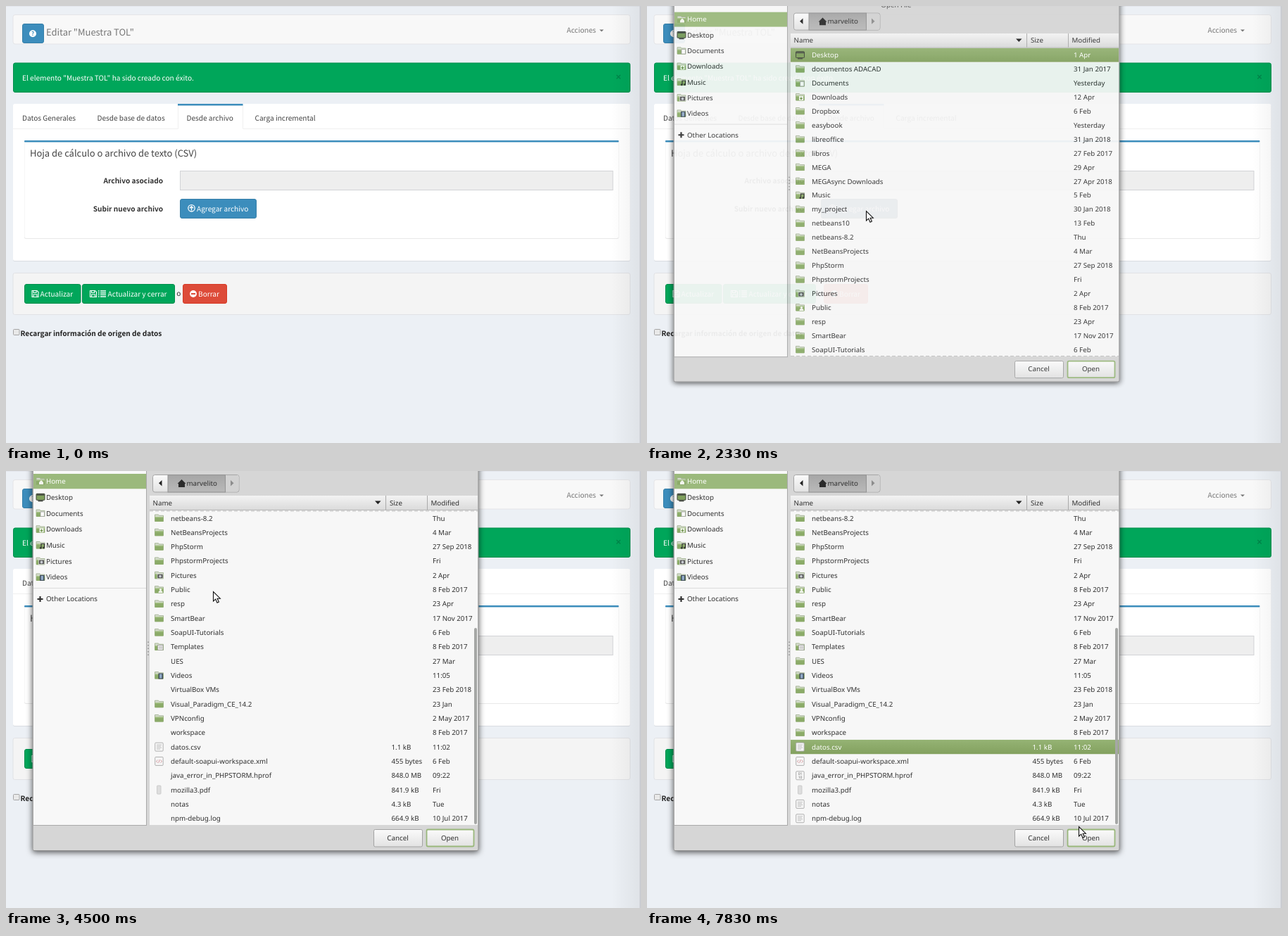
These frames come from a looping animation (902x621 px, 8 s). An HTML page:

```html
<!DOCTYPE html>
<html lang="es">
<head>
<meta charset="utf-8">
<title>Editar origen de datos</title>
<style>
  html, body { margin: 0; width: 100%; height: 100%; overflow: hidden; background: #ecf0f5; }
  svg { display: block; width: 902px; height: 621px; }
  text { text-rendering: geometricPrecision; white-space: pre; }
  .page { font: 10.1px "Noto Sans CJK JP", "Noto Sans CJK SC", "Noto Sans CJK", sans-serif; }
  .title { font-size: 12.96px; }
  .bold { font-weight: 700; }
  .dialog { font: 9.75px "Noto Sans", "Open Sans", sans-serif; }
</style>
</head>
<body>
<svg viewBox="0 0 902 621">
  <defs>
    <linearGradient id="edge"><stop stop-opacity="0"/><stop offset="1" stop-opacity=".055"/></linearGradient>
    <linearGradient id="row" x2="0" y2="1"><stop stop-color="#95b374"/><stop offset="1" stop-color="#83a15f"/></linearGradient>
    <linearGradient id="head" x2="0" y2="1"><stop stop-color="#f3f3f3"/><stop offset="1" stop-color="#dadada"/></linearGradient>
    <linearGradient id="button" x2="0" y2="1"><stop stop-color="#fbfbfb"/><stop offset="1" stop-color="#e2e2e2"/></linearGradient>
    <linearGradient id="pressed" x2="0" y2="1"><stop stop-color="#a6a6a6"/><stop offset="1" stop-color="#b9b9b9"/></linearGradient>
    <filter id="shadow" x="-5%" y="-5%" width="110%" height="110%">
      <feDropShadow dx="0" dy="2" stdDeviation="4" flood-opacity=".65"/>
    </filter>
    <clipPath id="listArea"><rect x="204" y="56" width="466" height="447"/></clipPath>
  </defs>
  <g id="page" class="page"></g>
  <g id="dialog" class="dialog"></g>
  <path id="cursor" d="M.5 .5V14L3.7 11.1 6 16.2 8.4 15.1 6.1 10.2H10.3Z" fill="#fff" stroke="#111" stroke-width="1.1"/>
</svg>
<script>
const $ = id => document.getElementById(id);
const STEPS = 48, STEP_MS = 1000 / 6;
const PROJECT = "Muestra TOL", USER = "marvelito";

// Cursor positions, one per step, keyed by the step at which each movement begins.
const MOVES = {
  3: [[59, 33], [103, 90], [160, 158], [220, 218], [272, 262], [318, 286], [337, 291]],
  10: [[298, 291], [311, 291]],
  19: [[304, 262], [277, 218], [266, 186], [294, 171]],
  33: [[301, 190], [310, 228], [299, 282], [280, 336], [261, 374], [251, 391]],
  43: [[302, 408], [395, 442], [488, 476], [578, 507], [613, 505]]
};

// name | modified | icon | size
const FILES = `Desktop|1 Apr|desktop
documentos ADACAD|31 Jan 2017|folder
Documents|Yesterday|page
Downloads|12 Apr|down
Dropbox|6 Feb|folder
easybook|Yesterday|folder
libreoffice|31 Jan 2018|folder
libros|27 Feb 2017|folder
MEGA|29 Apr|folder
MEGAsync Downloads|27 Apr 2018|folder
Music|5 Feb|music
my_project|30 Jan 2018|folder
netbeans10|13 Feb|folder
netbeans-8.2|Thu|folder
NetBeansProjects|4 Mar|folder
PhpStorm|27 Sep 2018|folder
PhpstormProjects|Fri|folder
Pictures|2 Apr|picture
Public|8 Feb 2017|public
resp|23 Apr|folder
SmartBear|17 Nov 2017|folder
SoapUI-Tutorials|6 Feb|folder
Templates|8 Feb 2017|template
UES|27 Mar|folder
Videos|11:05|video
VirtualBox VMs|23 Feb 2018|folder
Visual_Paradigm_CE_14.2|23 Jan|folder
VPNconfig|2 May 2017|folder
workspace|8 Feb 2017|folder
datos.csv|11:02|file|1.1 kB
default-soapui-workspace.xml|6 Feb|xml|455 bytes
java_error_in_PHPSTORM.hprof|09:22|binary|848.0 MB
mozilla3.pdf|Fri|pdf|841.9 kB
notas|Tue|file|4.3 kB
npm-debug.log|10 Jul 2017|file|664.9 kB`.split("\n").map(line => line.split("|"));
const ROW = 20.32, CSV = 29;
// Step at which slowly loaded icons show up.
const LATE_ICONS = { 23: 33, 25: 33, 28: 33, 31: 43, 33: 43, 34: 43 };

const rect = (x, y, w, h, fill, stroke = "none", r = 0, more = "") =>
  `<rect x="${x}" y="${y}" width="${w}" height="${h}" rx="${r}" fill="${fill}" stroke="${stroke}" ${more}/>`;
const path = (d, fill, stroke = "none", width = 1, more = "") =>
  `<path d="${d}" fill="${fill}" stroke="${stroke}" stroke-width="${width}" ${more}/>`;
const circle = (x, y, r, fill, stroke = "none", width = 1) =>
  `<circle cx="${x}" cy="${y}" r="${r}" fill="${fill}" stroke="${stroke}" stroke-width="${width}"/>`;
const text = (x, y, s, fill, more = "") => `<text x="${x}" y="${y}" fill="${fill}" ${more}>${s}</text>`;

const floppy = x =>
  path(`M${x} 404.5h7l2 2v7h-9zM${x + 2} 404.5v3h4v-3M${x + 2} 413.5v-3.5h5v3.5`, "none", "#fff", 1.1);

function drawPage(buttonState) {
  const [buttonFill, buttonEdge] = {
    idle: ["#3c8dbc", "#367fa9"], hover: ["#367fa9", "#2f6f94"], down: ["#2a4d74", "#122b40"]
  }[buttonState];
  const bold = 'class="bold"', boldEnd = 'class="bold" text-anchor="end"';
  return [
    rect(0, 0, 902, 621, "#ecf0f5"), rect(0, 0, 902, 1, "#e3e6ec"),
    // heading
    rect(10, 12.5, 876.5, 41.5, "#f8f8f8", "#e5e5e7", 3),
    rect(23.5, 25.5, 30, 27, "#3c8dbc", "#367fa9", 2.5),
    circle(38, 39.2, 5, "#fff"),
    text(38, 42.2, "?", "#3c8dbc", 'class="bold" font-size="8" text-anchor="middle"'),
    text(57, 42, `Editar "${PROJECT}"`, "#777", 'class="title"'),
    text(796.5, 38, "Acciones", "#777"), path("M843 33.5h6l-3 3z", "#777"),
    // notice
    rect(10.5, 81, 876, 41.5, "#00a65a", "#008d4c", 2.5),
    text(23, 106, `El elemento "${PROJECT}" ha sido creado con éxito.`, "#fff"),
    path("M867.3 98l5.4 5.4m0-5.4l-5.4 5.4", "none", "#00854a", 1.4),
    // tabs
    rect(10, 140, 876.5, 223, "#d9dce1", "none", 2.5), rect(10, 139, 876.5, 223, "#fff", "none", 2.5),
    path("M10 174.5H244.5V140M336.5 140V174.5H886", "none", "#f0f0f0"),
    rect(244, 139, 92.5, 2.5, "#3c8dbc"),
    text(23, 162.5, "Datos Generales", "#444"), text(129.5, 162.5, "Desde base de datos", "#444"),
    text(256.5, 162.5, "Desde archivo", "#444"), text(353.5, 162.5, "Carga incremental", "#444"),
    // upload box
    rect(26, 192, 844.5, 139, "#e8e8e8", "none", 2.5), rect(26.4, 192, 843.7, 138, "#fff", "none", 2.5),
    rect(26, 191, 844.5, 2.4, "#3c8dbc", "none", 1),
    text(34, 213.5, "Hoja de cálculo o archivo de texto (CSV)", "#444", 'class="title"'),
    text(223, 252, "Archivo asociado", "#333", boldEnd),
    rect(247.5, 234.5, 614.5, 27, "#eee", "#d2d3d6"),
    text(223, 292, "Subir nuevo archivo", "#333", boldEnd),
    rect(247.5, 274.5, 108, 27, buttonFill, buttonEdge, 2.5),
    circle(263.5, 287.3, 4.7, "none", "#fff", 1.3),
    path("M263.5 290.5V285M261 287.2l2.5-2.5 2.5 2.5", "none", "#fff", 1.4),
    text(271, 292, "Agregar archivo", "#fff"),
    // actions
    rect(10, 379.5, 876.5, 59, "#f4f4f4", "#e1e2e5", 2.5),
    rect(26.5, 395.5, 79.5, 27, "#00a65a", "#008d4c", 2.5), floppy(37), text(48.5, 413, "Actualizar", "#fff"),
    rect(108.5, 395.5, 131, 27, "#00a65a", "#008d4c", 2.5), floppy(119.5),
    path("M131 405h1.6m1.4 0h8M131 407.7h1.6m1.4 0h8M131 410.4h1.6m1.4 0h8M131 413h1.6m1.4 0h8", "none", "#fff", 1.4),
    text(144.5, 413, "Actualizar y cerrar", "#fff"), text(242.3, 412, "o", "#333"),
    rect(251.5, 395.5, 62, 27, "#dd4b39", "#d73925", 2.5),
    circle(266, 409, 4.9, "#fff"), rect(263, 408, 6, 2, "#dd4b39"), text(273, 413, "Borrar", "#fff"),
    rect(10.5, 459.5, 8.5, 8, "#e9e9e9", "#a5a5a5", 1),
    text(20.5, 469, "Recargar información de origen de datos", "#222", bold),
    rect(860, 0, 40, 621, "url(#edge)"), rect(900, 0, 2, 621, "#cbcdd2")
  ].join("");
}

function emblem(kind) {
  return {
    page: rect(6.5, -2, 5.5, 6.5, "#fafafa", "#999", 0, 'stroke-width=".7"'),
    down: rect(5, -1.5, 6, 6, "#f2f5ee") + path("M8 -.5v2.5M6.4 1.5h3.2L8 3.6z", "#6b8f48", "#6b8f48", .8),
    music: path("M7.5 3.5V-2h4.5v5", "none", "#333", 1.2) + circle(6.8, 3.8, 1.4, "#333") + circle(11, 3.6, 1.4, "#333"),
    picture: rect(4, -2, 8, 6.5, "#555", "#eee", 0, 'stroke-width=".6"') + circle(8, 1.3, 1.9, "#c8ccd2"),
    public: circle(8.5, 0, 1.6, "#f2f5ee") + path("M5.5 4.5q0-3 3-3t3 3z", "#f2f5ee"),
    template: rect(4.5, -2.5, 7.5, 7, "#eee", "#999", 0, 'stroke-width=".7"') + path("M6 0h5M6 2h5", "none", "#999", .7),
    video: rect(5.5, -3, 6.5, 8, "#3e4a57") + rect(7, -2, 3.5, 6, "#8fa9c6"),
    home: path("M4.5 1.5L7.5 -1.5 10.5 1.5V4.5h-6z", "#f2f5ee")
  }[kind] || "";
}

function icon(kind, x, y) {
  const sheet = rect(.7, -6, 11.5, 12, "#f5f5f5", "#aaa", 1.2, 'stroke-width=".9"');
  const art = {
    desktop: () => rect(.5, -5, 12, 9, "#7fa05c", "#3d4238", .8) + rect(1, -4.5, 11, 2, "#4a5045") + path("M3 5.3h7", "none", "#3d4238", 1.4),
    file: () => sheet + path("M3 -3h7M3 -1h6M3 1h7M3 3h5", "none", "#b5b5b5", .8),
    xml: () => sheet + path("M4.5 -1.8l-2 2 2 2M8.5 -1.8l2 2-2 2M7.2 -2.2l-1.4 4.4", "none", "#cc7f86", .8),
    binary: () => sheet + text(6.5, -.6, "01", "#666", 'font-size="5" text-anchor="middle"') + text(6.5, 4.4, "10", "#666", 'font-size="5" text-anchor="middle"'),
    pdf: () => rect(3.5, -6, 5.5, 12, "#dedede", "#c5c5c5", 1, 'stroke-width=".8"')
  }[kind];
  const folder = () => path("M.5 4.5V-5h5l1 1.3h6V4.5z", "#d5dccd", "#9aab88", .8) + rect(.5, -2, 12, 7, "#8bab68", "none", .6) + rect(.5, -2, 12, 1.3, "#a9c48a") + emblem(kind);
  return `<g transform="translate(${x} ${y})">${(art || folder)()}</g>`;
}

function drawSidebar() {
  const places = ["Home|home", "Desktop|desktop", "Documents|page", "Downloads|down", "Music|music", "Pictures|picture", "Videos|video"];
  return rect(38.5, -20, 161, 523.5, "#f8f8f8", "#a9a9a9") + rect(39, 4, 160, 21.3, "#9bb97c") +
    places.map((place, i) => {
      const [name, kind] = place.split("|"), y = 14.6 + i * 22.72;
      return icon(kind, 42.5, y) + text(57, y + 3.5, name, i ? "#303030" : "#fff");
    }).join("") +
    rect(39, 166, 160, 1, "#dcdcdc") +
    path("M44.5 182h8M48.5 178v8", "none", "#303030", 2.2) + text(57, 185.3, "Other Locations", "#303030") +
    path("M202 242.5v20", "none", "#8d8d8d", 1.5, 'stroke-dasharray="1.5 3"');
}

function drawList(step) {
  const scrolled = step >= 27, selected = step >= 40 ? CSV : 0;
  const top = scrolled ? 67 - 13 * ROW : 66.2;
  const rows = FILES.map(([name, modified, kind, size = ""], i) => {
    const y = top + i * ROW, color = i === selected ? "#fff" : "#303030";
    if (y < 50 || y > 510) return "";
    return (i === selected ? rect(204, y - 10.2, 466, ROW, "url(#row)") : "") +
      (step >= (LATE_ICONS[i] || 0) ? icon(kind, 211, y) : "") +
      text(234, y + 3.5, name, color) + text(547.5, y + 3.5, size, color) + text(606, y + 3.5, modified, color);
  }).join("");
  const barOpacity = step < 19 || step === 41 || step === 42 ? 0 : step === 40 ? .5 : 1;
  return `<g clip-path="url(#listArea)">` + rect(204, 56, 466, 447, "#f7f7f7") + rows +
    path(`M204 ${scrolled ? 57 : 502.3}H670`, "none", "#c2c2c2", 1, 'stroke-dasharray="5 3"') +
    rect(665, scrolled ? 223 : 58, 4, 279, "#a5a7a5", "none", 2, `opacity="${barOpacity}"`) + "</g>";
}

function drawDialog(step) {
  const label = (x, s) => text(x, 524.7, s, "#303030", 'text-anchor="middle"');
  return [
    rect(38, -20, 633, 559.5, "#d6d6d6", "#8a8a8a", 2, 'filter="url(#shadow)"'),
    text(354, -3, "Open File", "#555", 'text-anchor="middle"'),
    drawSidebar(),
    // path bar
    rect(208.5, 5.5, 122.5, 24.5, "url(#button)", "#a5a5a5", 3),
    rect(311.5, 6, 19, 23.5, "#d2d2d2", "none", 2),
    rect(230, 5.5, 81.5, 24.5, "url(#pressed)", "#939393"),
    path("M221.5 13v8.5l-4.5-4.2z", "#222"), path("M319 13v8.5l4.5-4.2z", "#8d8d8d"),
    path("M243.5 18l6-6 6 6h-1.5v5h-9v-5z", "#2b2b2b"),
    text(256.5, 20.8, USER, "#303030"),
    // column heads
    rect(204, 35, 466, 20.5, "url(#head)"), rect(204, 55, 466, 1, "#b5b5b5"),
    path("M539.5 35v20M598.5 35v20", "none", "#aaa"),
    text(208.5, 48.5, "Name", "#303030"), text(545, 48.5, "Size", "#303030"), text(603.5, 48.5, "Modified", "#303030"),
    path("M524 42.5h8.5l-4.2 4.7z", "#222"),
    drawList(step),
    rect(522.5, 509.5, 69, 24.5, "url(#button)", "#a3a3a3", 2), label(556.5, "Cancel"),
    rect(597.5, 509.5, 67, 24, "url(#button)", "#9ab87c", 2, 'stroke-width="1.8"'), label(630.5, "Open")
  ].join("");
}

function cursorAt(step) {
  const start = Object.keys(MOVES).map(Number).filter(s => s <= step).pop();
  const points = MOVES[start];
  return points && points[Math.min(step - start, points.length - 1)];
}

function render(step) {
  const tip = cursorAt(step);
  const overButton = tip && tip[0] > 247 && tip[0] < 356 && tip[1] > 274 && tip[1] < 302;
  $("page").innerHTML = drawPage(step >= 13 ? "down" : overButton ? "hover" : "idle");

  const opening = step === 14;
  $("dialog").innerHTML = step >= 14 ? drawDialog(step) : "";
  $("dialog").setAttribute("opacity", opening ? .94 : 1);
  $("dialog").setAttribute("transform", opening ? "translate(0 249.5) scale(1 .981) translate(0 -249.5)" : "");

  $("cursor").style.display = tip ? "" : "none";
  if (tip) $("cursor").setAttribute("transform", `translate(${tip})`);
}

let shown = -1;
function tick() {
  // The small offset absorbs rounding of step boundaries to whole frames.
  const step = Math.floor((performance.now() + 4) / STEP_MS) % STEPS;
  if (step !== shown) render(shown = step);
  requestAnimationFrame(tick);
}
tick();
</script>
</body>
</html>
```
